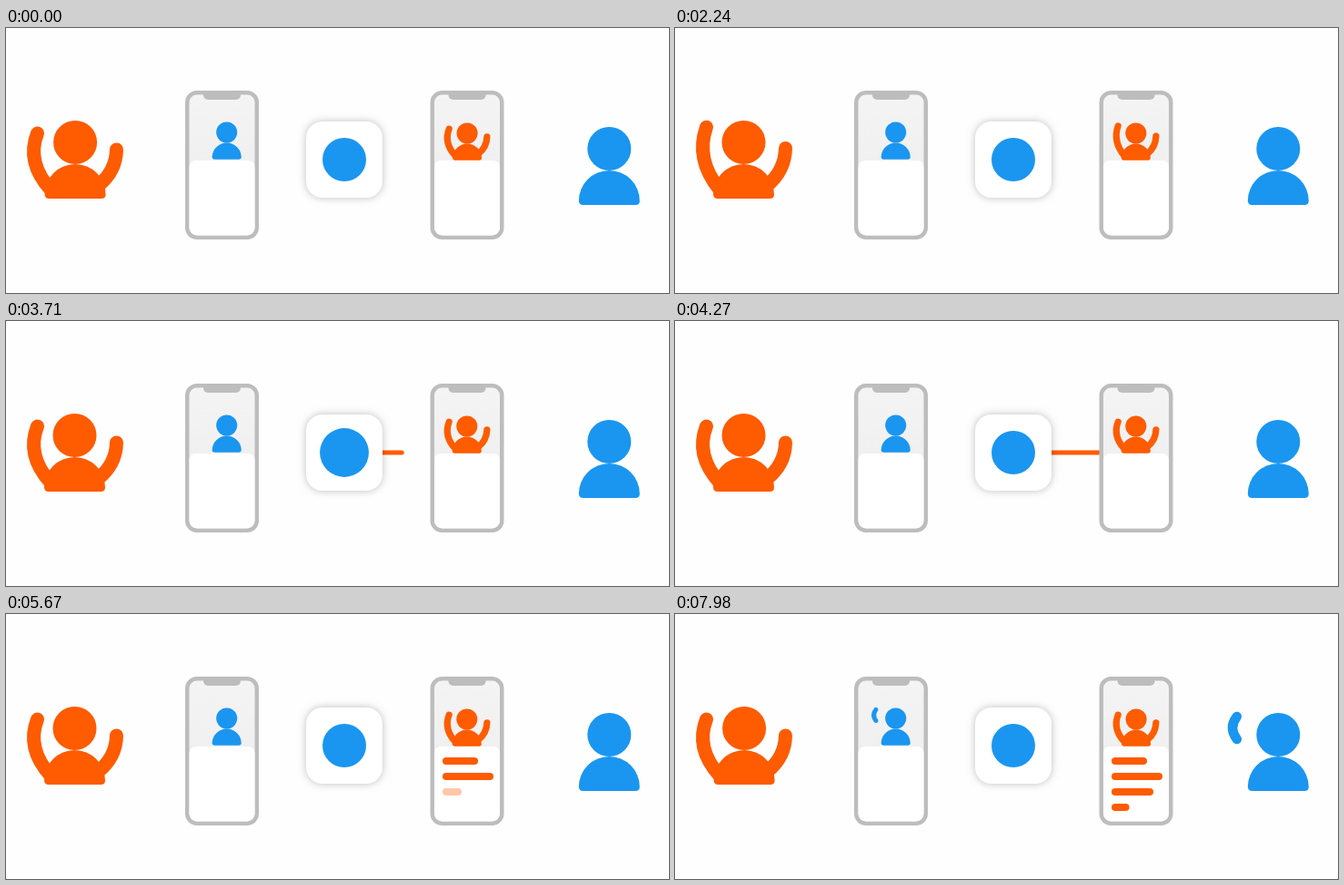
An HTML page with a canvas for the animation above (8 s loop, 729 by 292 pixels).

```html
<!DOCTYPE html>
<html lang="en">
<head>
<meta charset="utf-8">
<title>Two people, two phones</title>
<style>
html, body { margin: 0; width: 100%; height: 100%; overflow: hidden; background: #fefefe; }
canvas { display: block; width: 729px; height: 292px; }
</style>
</head>
<body>
<canvas id="stage"></canvas>
<script>
const W = 729, H = 292, LOOP = 8000;
const ORANGE = '#ff5b00', BLUE = '#1a96f0', GREY = '#bdbdbd', PAPER = '#fefefe';
const canvas = document.getElementById('stage');
const ctx = canvas.getContext('2d');
const ratio = window.devicePixelRatio || 1;
canvas.width = W * ratio;
canvas.height = H * ratio;

// Linear progress of t through [from, to], clamped to 0..1
const span = (t, from, to) => Math.min(1, Math.max(0, (t - from) / (to - from)));

function roundBox(x, y, w, h, r, color) {
  ctx.beginPath();
  ctx.roundRect(x, y, w, h, r);
  ctx.fillStyle = color;
  ctx.fill();
}

function disc(x, y, r, color) {
  ctx.beginPath();
  ctx.arc(x, y, r, 0, Math.PI * 2);
  ctx.fillStyle = color;
  ctx.fill();
}

function limb(x0, y0, cx, cy, x1, y1, width, color) {
  ctx.beginPath();
  ctx.moveTo(x0, y0);
  ctx.quadraticCurveTo(cx, cy, x1, y1);
  ctx.lineWidth = width;
  ctx.lineCap = 'round';
  ctx.strokeStyle = color;
  ctx.stroke();
}

// Figures are drawn around the centre of the head
function place(x, y, scale, draw) {
  ctx.save();
  ctx.translate(x, y);
  ctx.scale(scale, scale);
  draw();
  ctx.restore();
}

function torso(color) {
  ctx.beginPath();
  ctx.moveTo(-33.5, 57);
  ctx.arc(0, 57.5, 33.5, Math.PI, 0);
  ctx.quadraticCurveTo(33.5, 62, 28.5, 62);
  ctx.lineTo(-28.5, 62);
  ctx.quadraticCurveTo(-33.5, 62, -33.5, 57);
  ctx.fillStyle = color;
  ctx.fill();
}

function caller(t) {
  const phase = span(t, 1540, 2850) * Math.PI * 4;
  const left = -16 * Math.sin(phase);
  const right = -16 * (1 - Math.cos(phase));
  const sway = 0.6 * (1 - span(t, 70, 980) + span(t, 7420, 7980));
  limb(-41, -10 + left, -53.5, 22 + left / 2, -26.5, 52, 15, ORANGE);
  limb(46, 8 + right, 45.5, 32 + right / 2, 25.5, 48, 15, ORANGE);
  ctx.translate(sway, 0);
  torso(ORANGE);
  disc(0, 0, 24, ORANGE);
}

function listener(t) {
  const grow = span(t, 7500, 7980);
  if (grow > 0) {
    // First part of the arm's curve, split at the growth point
    const x0 = -45.5, y0 = -20, cx = -55, cy = -7.5, x1 = -45.5, y1 = 5;
    const mx = x0 + (cx - x0) * grow, my = y0 + (cy - y0) * grow;
    const nx = cx + (x1 - cx) * grow, ny = cy + (y1 - cy) * grow;
    limb(x0, y0, mx, my, mx + (nx - mx) * grow, my + (ny - my) * grow, 10.5 * Math.sqrt(grow), BLUE);
  }
  torso(BLUE);
  disc(0, 0, 24, BLUE);
}

function phone(x, person) {
  const glass = ctx.createLinearGradient(0, 72, 0, 146);
  glass.addColorStop(0, '#f4f4f4');
  glass.addColorStop(1, '#f0f0f0');
  roundBox(x, 69, 81, 164, 13, GREY);
  roundBox(x + 4.5, 73.5, 72, 155, 8.5, glass);
  roundBox(x + 20, 70, 41, 9, [0, 0, 5, 5], GREY);
  person();
  roundBox(x + 4.5, 146, 72, 82.5, [7, 7, 8.5, 8.5], '#fff');
}

function link(t, x0, x1, growAt, grown, shrinkAt, gone) {
  if (t < growAt || t >= gone) return;
  const tail = x0 + (x1 - x0) * span(t, shrinkAt, gone);
  const front = x0 + (x1 - x0) * span(t, growAt, grown);
  limb(tail, 145, (tail + front) / 2, 145, front, 145, 5, ORANGE);
}

function tile(t) {
  ctx.save();
  ctx.shadowColor = 'rgba(0,0,0,.25)';
  ctx.shadowBlur = 9 * ratio;
  roundBox(330, 103, 84, 84, 18, '#fff');
  ctx.restore();
  const pulse = Math.sin(Math.PI * span(t, 3500, 4000));
  disc(372, 145, 24 + 3 * pulse, BLUE);
}

// Message lines: row, full width, start, end
const LINES = [
  [0, 39, 4500, 5000],
  [1, 56, 5000, 5500],
  [2, 46, 5500, 6000],
  [3, 19.5, 6000, 6350]
];

function message(t) {
  for (const [row, width, from, to] of LINES) {
    const p = span(t, from, to);
    if (p === 0) continue;
    ctx.globalAlpha = p;
    roundBox(480, 158 + row * 17, 8 + (width - 8) * p, 8, 4, ORANGE);
  }
  ctx.globalAlpha = 1;
}

function draw(t) {
  ctx.setTransform(ratio, 0, 0, ratio, 0, 0);
  ctx.fillStyle = PAPER;
  ctx.fillRect(0, 0, W, H);

  link(t, 277, 332, 2850, 3200, 3220, 3600);
  link(t, 412, 467, 3500, 4000, 4500, 5000);
  tile(t);

  phone(197, () => place(242.7, 115, 0.48, () => listener(t)));
  phone(466.5, () => place(506.8, 116, 0.48, () => caller(t)));
  message(t);

  place(75.5, 126, 1, () => caller(t));
  place(663.3, 133, 1, () => listener(t));
}

const start = performance.now();
function tick() {
  draw((performance.now() - start) % LOOP);
  requestAnimationFrame(tick);
}
tick();
</script>
</body>
</html>
```
